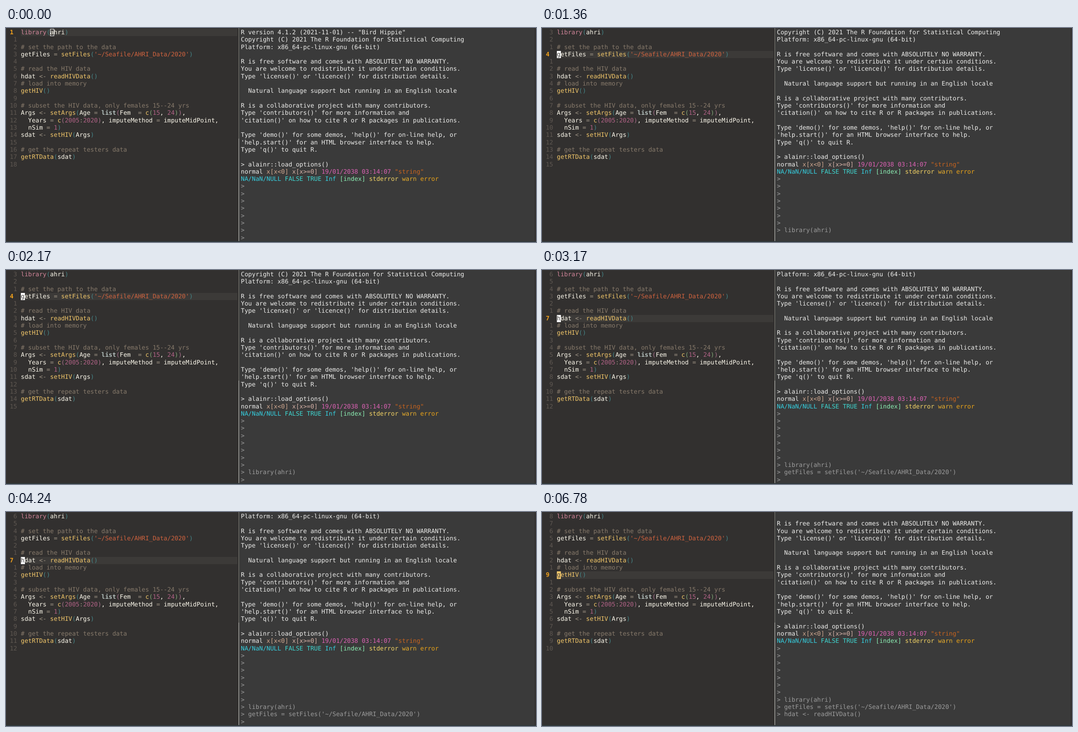
Animation, 1178 px wide and 476 px high, one loop 8 s. Source, as an HTML page:

```html
<!DOCTYPE html>
<html lang="en">
<head>
<meta charset="utf-8">
<title>R session</title>
<style>
  html, body { margin: 0; width: 100%; height: 100%; overflow: hidden; background: #32302f; }
  #stage { position: relative; width: 1178px; height: 476px; overflow: hidden; }
  #stage, pre {
    margin: 0; font: 13.53px/16.32px "DejaVu Sans Mono", monospace;
    text-rendering: geometricPrecision; font-variant-ligatures: none;
  }
  #stage > * { position: absolute; box-sizing: border-box; }
  pre { top: 1.9px; white-space: pre; }
  #gutter { left: 8.4px; color: #5f5852; }
  #gutter b { color: #f0a01c; }
  #code { left: 33px; color: #fdf9ec; }
  #console { left: 522.1px; color: #eeeeec; }
  #bar { left: 33px; width: 481px; height: 16.3px; background: #3c3a38; }
  #cursor { width: 8.6px; height: 16.3px; white-space: pre; color: #45413f; }
  #cursor.hollow { border: 1px solid #fff; }
  #right { left: 518px; top: 1px; width: 657px; height: 473px; background: #3a3a3a; }
  #edge { left: 517px; top: 0; width: 1px; height: 474px;
          background: linear-gradient(#85857c 246px, #d8d8d2 246px); }
  #foot { left: 0; top: 474px; width: 1178px; height: 2px; background: #2f383b; }
  .comment { color: #877a6b; }
  .string { color: #d0633f; }
  .number { color: #b16286; }
  .call { color: #f2c76a; }
  .library { color: #d3869b; }
  .list { color: #b3bfbc; font-weight: bold; }
  .op { color: #a09586; }
  .p1 { color: #458588; }
  .p2 { color: #a8708c; }
  .p3 { color: #82a878; }
  .typed { color: #9c9c9c; }
</style>
</head>
<body>
<div id="stage">
  <div id="right"></div>
  <div id="edge"></div>
  <div id="foot"></div>
  <div id="bar"></div>
  <pre id="gutter"></pre>
  <pre id="code"></pre>
  <pre id="console"></pre>
  <div id="cursor"></div>
</div>
<script>
const CELL = 8.148, LINE = 16.32, LEFT = 33, TOP = 1.9, ROWS = 29, LOOP = 8000;
const $ = id => document.getElementById(id);
const escape = s => s.replace(/</g, '&lt;').replace(/>/g, '&gt;');
const span = (kind, s) => `<span class="${kind}">${escape(s)}</span>`;
const tint = (color, s) => `<span style="color:${color}">${escape(s)}</span>`;

const source = `library(ahri)

# set the path to the data
getFiles = setFiles('~/Seafile/AHRI_Data/2020')

# read the HIV data
hdat <- readHIVData()
# load into memory
getHIV()

# subset the HIV data, only females 15--24 yrs
Args <- setArgs(Age = list(Fem  = c(15, 24)),
  Years = c(2005:2020), imputeMethod = imputeMidPoint,
  nSim = 1)
sdat <- setHIV(Args)

# get the repeat testers data
getRTData(sdat)
`.split('\n');

const banner = `R version 4.1.2 (2021-11-01) -- "Bird Hippie"
Copyright (C) 2021 The R Foundation for Statistical Computing
Platform: x86_64-pc-linux-gnu (64-bit)

R is free software and comes with ABSOLUTELY NO WARRANTY.
You are welcome to redistribute it under certain conditions.
Type 'license()' or 'licence()' for distribution details.

  Natural language support but running in an English locale

R is a collaborative project with many contributors.
Type 'contributors()' for more information and
'citation()' on how to cite R or R packages in publications.

Type 'demo()' for some demos, 'help()' for on-line help, or
'help.start()' for an HTML browser interface to help.
Type 'q()' to quit R.

> alainr::load_options()`.split('\n').map(escape);

const palette = [
  'normal ' + tint('#d0a890', 'x[x<0] ') + tint('#d7b3a8', 'x[x>=0] ') +
    tint('#dc62b4', '19/01/2038 03:14:07 ') + tint('#c8641e', '"string"'),
  tint('#35cfe0', 'NA/NaN/NULL ') + tint('#3fd8d2', 'FALSE TRUE ') + tint('#35cfe0', 'Inf ') +
    tint('#8cf0b4', '[index] ') + tint('#f5d566', 'stderror ') + tint('#e6ac2c', 'warn ') +
    tint('#eda518', 'error')
];

const typed = s => span('typed', s);
const history = [...banner, ...palette, ...Array(7).fill(typed('>'))];
const commands = [0, 3, 6].map(row => typed('> ' + source[row]));

function highlight(text) {
  let depth = 0;
  const token = /(#.*)|('[^']*')|(\d+)|([A-Za-z]+(?=\())|(<-|[=:])|([()])/g;
  return text.replace(token, (s, comment, string, number, call, op) => {
    if (comment) return span('comment', s);
    if (string) return span('string', s);
    if (number) return span('number', s);
    if (call) return span(s === 'library' || s === 'list' ? s : 'call', s);
    if (op) return span('op', s);
    return span('p' + (s === '(' ? ++depth : depth--), s);
  });
}

// at: start in ms; ran: commands sent to the console; ready: a prompt is waiting
const steps = [
  { at: 0, row: 0, col: 8, ran: 0, ready: true, hollow: true },
  { at: 530, row: 0, col: 8, ran: 0, ready: true },
  { at: 1360, row: 3, col: 0, ran: 1 },
  { at: 2170, row: 3, col: 0, ran: 1, ready: true },
  { at: 3170, row: 6, col: 0, ran: 2, ready: true },
  { at: 4960, row: 8, col: 0, ran: 3, color: '#f2c76a' }
];

function show({ row, col, ran, ready, hollow, color = '#fff' }) {
  $('gutter').innerHTML = source.map((_, i) =>
    i === row ? `<b>${row + 1}</b>` : String(Math.abs(i - row)).padStart(2)).join('\n');

  const lines = [...history, ...commands.slice(0, ran)];
  if (ready) lines.push(typed('>'));
  $('console').innerHTML = lines.slice(ran, ran + ROWS).join('\n');

  const top = TOP + row * LINE + 'px';
  $('bar').style.top = top;
  const cursor = $('cursor');
  cursor.className = hollow ? 'hollow' : '';
  cursor.style.top = top;
  cursor.style.left = LEFT + col * CELL + 'px';
  cursor.style.background = hollow ? 'none' : color;
  cursor.textContent = hollow ? '' : source[row][col];
}

$('code').innerHTML = highlight(source.join('\n'));
let current;
function tick() {
  const time = performance.now() % LOOP;
  const step = steps.filter(s => s.at <= time).pop();
  if (step !== current) show(current = step);
  requestAnimationFrame(tick);
}
tick();
</script>
</body>
</html>
```
